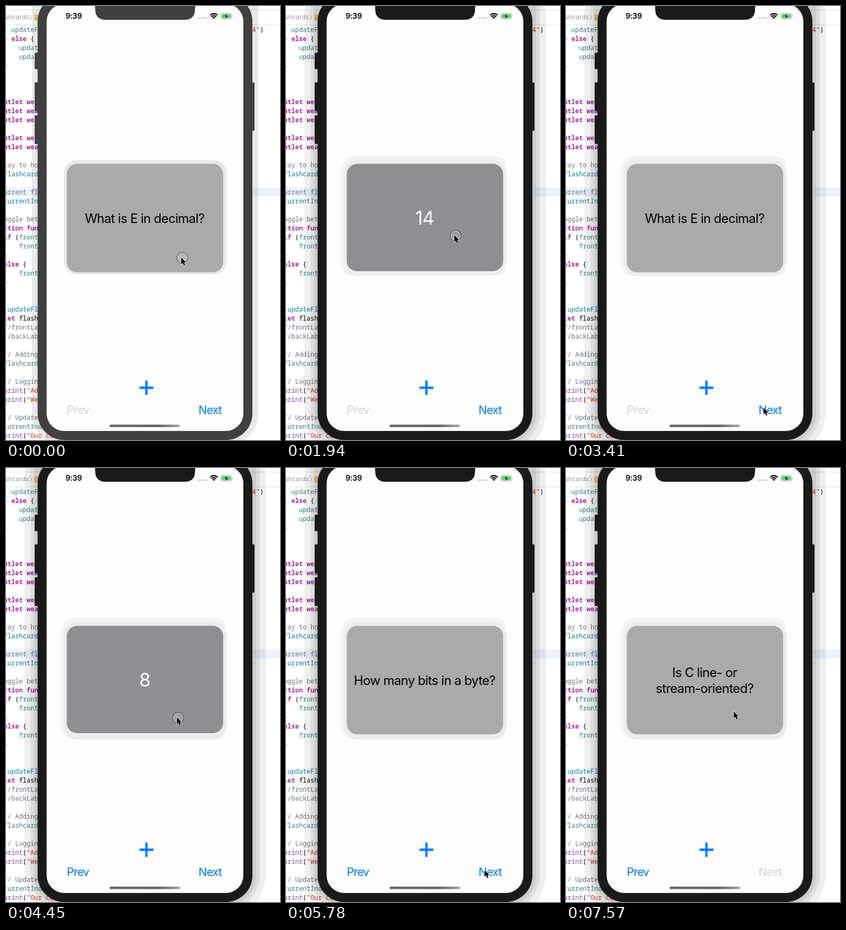
Animation of 516x818 px, one loop 8000 ms. Source, as an HTML page:

```html
<!DOCTYPE html>
<html lang="en">
<head>
<meta charset="utf-8">
<title>Flashcards</title>
<style>
  html, body { margin: 0; width: 100%; height: 100%; overflow: hidden; background: #fff; }
  svg { display: block; width: 516px; height: 818px; }
  text { font-family: Inter, Roboto, sans-serif; white-space: pre; }
  #code text { font: 12px "Noto Sans Mono", "DejaVu Sans Mono", monospace; }
  #code .key { fill: #a42f9c; font-weight: 700; }
  #code .call { fill: #3e7d86; }
  #code .own { fill: #0f7ba3; }
  #code .note { fill: #687684; }
  #code .sys { fill: #7d45b0; }
  #code .str { fill: #d12f1b; }
  .question { font-size: 24px; letter-spacing: -.7px; }
  .answer { font-size: 35px; font-weight: 400; fill: #fff; letter-spacing: -1px; }
  .button { font-size: 21.5px; letter-spacing: -1px; }
</style>
</head>
<body>
<svg viewBox="0 0 516 818">
  <defs>
    <linearGradient id="bar">
      <stop offset="0" stop-color="#6c6c6c"/>
      <stop offset=".7" stop-color="#666"/>
      <stop offset="1" stop-color="#aaa"/>
    </linearGradient>
  </defs>
  <rect width="516" height="818" fill="#fff"/>

  <path d="M0 7.5H516M0 35.5H516" stroke="#dedede"/>
  <text x="-2" y="25" font-size="12" fill="#9b9b9b">shcards</text>
  <path d="M44 15l4 6.500-4 6.500" fill="none" stroke="#a5a5a5"/>
  <rect x="53" y="16" width="14" height="11" rx="1.500" fill="#f0cf73"/>
  <rect y="342" width="516" height="17" fill="#ebf2fc"/>
  <g id="code"></g>

  <g id="halo"></g>

  <g id="bezel">
    <rect x="54" y="88" width="8" height="31" rx="1.500"/>
    <rect x="54" y="144" width="8" height="54" rx="1.500"/>
    <rect x="54" y="206" width="8" height="54" rx="1.500"/>
    <rect x="461" y="144" width="7" height="91" rx="1.500"/>
    <rect x="59.500" y="-21" width="404.500" height="839" rx="50"/>
  </g>
  <rect x="76.500" y="-4" width="370.500" height="805" rx="33" fill="#fdfdfd"/>
  <path id="notch" d="M160 -4Q168 -4 168 4V6Q168 26 188 26H336Q356 26 356 6V4Q356 -4 364 -4Z"/>

  <text x="112" y="24" font-size="14.500" font-weight="600" letter-spacing="-.4">9:39</text>
  <g fill="#b9b9b9">
    <circle cx="363.500" cy="23" r="1.500"/><circle cx="368" cy="23" r="1.500"/>
    <circle cx="372.500" cy="23" r="1.500"/><circle cx="377" cy="23" r="1.500"/>
  </g>
  <g fill="none" stroke="#000" stroke-width="2.300">
    <path d="M384.500 17.500Q391.500 11 398.500 17.500M387 20.300Q391.500 16 396 20.300"/>
    <path d="M389 21.500Q391.500 19.500 394 21.500L391.500 24.500Z" fill="#000" stroke="none"/>
  </g>
  <rect x="404.500" y="14" width="20.500" height="10.500" rx="3" fill="#fff" stroke="#a9a9a9"/>
  <rect x="406" y="15.500" width="17.500" height="7.500" rx="1.700" fill="#4cd964"/>
  <path d="M426.500 17.500q1.500 1.700 0 3.500z" fill="#a9a9a9"/>
  <path d="M416.500 13.500l-6 6.500h3.500l-1.500 5.500 6.500-7h-3.700z" fill="#111" stroke="#d9f7de" stroke-width=".6"/>

  <path id="outerGlow" d="M103 316Q103 282 137 282H386Q403 282 413 291V500Q404 509 388 509H130Q103 509 103 482Z" fill="#f3f3f3"/>
  <rect id="innerGlow" x="109" y="290" width="306.500" height="216" rx="25" fill="#e8e8e8"/>
  <rect id="strip" x="116" y="400" width="292" height="102" rx="19" fill="#fbfbfb"/>
  <rect id="card" x="114.500" y="297.500" width="294.500" rx="19.500"/>
  <g id="label" text-anchor="middle"></g>

  <path d="M264.500 706V733M251.500 719.500H277.500" stroke="#007aff" stroke-width="4.300"/>
  <text id="prev" class="button" x="114.500" y="768.500">Prev</text>
  <text id="next" class="button" x="362.500" y="768.500">Next</text>
  <rect x="195" y="789" width="133" height="4.800" rx="2.400" fill="url(#bar)"/>

  <g id="cursor">
    <g id="touch">
      <circle cx="2.200" cy="1" r="10.200" fill="#fff" fill-opacity=".15" stroke="#222"/>
      <circle cx="2.200" cy="1" r="9.200" fill="none" stroke="#fff" stroke-opacity=".7"/>
    </g>
    <path d="M0 0V12.700L2.900 10 5 15 7.200 14 5.200 9.200H9.100Z" stroke="#fff" stroke-width="1.600" stroke-opacity=".8" paint-order="stroke"/>
  </g>
</svg>
<script>
const LOOP = 8000;
const $ = id => document.getElementById(id);

// Each row: line number, column, then class:text runs separated by "|".
const LINE = 17, COLUMN = 7.2;
const source = [
  [0, 2, "call:updateFlash"], [0, 65, 'str:4"|:)'],
  [1, 0, ":} |key:else|: {"], [2, 4, "call:update"], [3, 4, "call:update"], [4, 0, ":}"],
  [8, 0, "key:utlet weak"], [9, 0, "key:utlet weak"], [10, 0, "key:utlet weak"],
  [12, 0, "key:utlet weak"], [13, 0, "key:utlet weak"],
  [15, 0, "note:ray to hold"], [16, 0, "own:flashcards"],
  [18, 0, "note:urrent flash"], [19, 0, "own:currentIndex"],
  [21, 0, "note:oggle betw"], [22, 0, "key:ction func"],
  [23, 0, "key:if|: (|call:front"], [24, 4, "call:front"], [25, 0, ":}"],
  [26, 0, "key:else|: {"], [27, 4, "call:front"], [28, 0, ":}"],
  [31, 1, "own:updateFlash"], [32, 0, "key:let|: flashcard"],
  [33, 0, "note://frontLabel"], [34, 0, "note://backLabel"],
  [36, 0, "note:// Adding"], [37, 0, "call:flashcards"],
  [39, 0, "note:// Logging"], [40, 0, 'sys:print|:(|str:"Added'], [41, 0, 'sys:print|:(|str:"We now'],
  [43, 0, "note:// Update"], [44, 0, "call:currentIndex"], [45, 0, 'sys:print|:(|str:"Our cur']
];
const run = part => {
  const cut = part.indexOf(":");
  return `<tspan class="${part.slice(0, cut)}">${part.slice(cut + 1)}</tspan>`;
};
$("code").innerHTML = source.map(([line, column, text]) =>
  `<text x="${-4.4 + column * COLUMN}" y="${49 + line * LINE}">${text.split("|").map(run).join("")}</text>`
).join("");

const shadow = (spread, alpha) =>
  `<rect x="${60 - spread}" y="-60" width="${404 + 2 * spread}" height="${878 + spread}"
    rx="${50 + spread}" fill="#000" fill-opacity="${alpha}"/>`;
const idleHalo = shadow(11, .09);
const activeHalo = shadow(25, .065) + shadow(14, .07) + shadow(7, .08);

// Cursor tip: time, x, y; every position holds until the next.
const path = [
  [0, 330, 474], [1490, 323.5, 455], [1640, 319, 437], [1790, 317, 432],
  [2830, 319, 450], [2970, 325, 520], [3120, 338, 620], [3270, 353, 710], [3410, 372, 757], [3560, 374, 758],
  [4000, 358, 680], [4150, 332, 540], [4300, 322, 470],
  [5190, 324, 490], [5340, 334, 570], [5480, 350, 670], [5630, 368, 740], [5780, 374, 758],
  [6380, 356, 670], [6530, 328, 530], [6680, 316, 459]
];
const presses = [
  [0, 290], [1790, 2090], [2530, 2680], [3700, 4000], [4300, 4590],
  [4890, 5040], [6080, 6380], [6680, 6970], [7420, 7570]
];
const cards = [
  { ask: ["What is E in decimal?"], reply: "14" },
  { ask: ["How many bits in a byte?"], reply: "8" },
  { ask: ["Is C line- or", "stream-oriented?"], reply: "Stream" }
];
const FOCUS = 1790;
const turns = [3850, 6230];
const flips = [1940, 2680, 4450, 5040, 6820, 7570];

const passed = (times, t) => times.filter(time => time <= t).length;
const show = (id, on) => { $(id).style.display = on ? "" : "none"; };
const write = (id, html) => { if ($(id).dataset.now !== html) $(id).innerHTML = $(id).dataset.now = html; };

function draw(t) {
  const index = passed(turns, t);
  const answered = passed(flips, t) % 2 === 1;
  const active = t >= FOCUS;
  const { ask, reply } = cards[index];

  $("bezel").setAttribute("fill", active ? "#1a1a1a" : "#404040");
  $("notch").setAttribute("fill", active ? "#1a1a1a" : "#404040");
  write("halo", active ? activeHalo : idleHalo);
  show("outerGlow", active);
  $("innerGlow").setAttribute("height", index ? 222 : 216);
  $("innerGlow").setAttribute("fill", active ? "#ececec" : "#e8e8e8");

  show("strip", answered);
  $("card").setAttribute("height", answered ? 202.5 : 204.5);
  $("card").setAttribute("fill", answered ? "#8e8e93" : "#aaa");
  write("label", answered
    ? `<text class="answer" x="261" y="412">${reply}</text>`
    : ask.map((line, i) =>
        `<text class="question" x="261" y="${409 + 30 * (i - (ask.length - 1) / 2)}">${line}</text>`).join(""));

  $("prev").setAttribute("fill", index ? "#007aff" : "#d6d6d6");
  $("next").setAttribute("fill", index < cards.length - 1 ? "#007aff" : "#d6d6d6");

  const [, x, y] = path.filter(([time]) => time <= t).pop();
  $("cursor").setAttribute("transform", `translate(${x} ${y})`);
  show("touch", presses.some(([from, to]) => t >= from && t < to));
}

const start = performance.now();
function tick() {
  draw((performance.now() - start) % LOOP);
  requestAnimationFrame(tick);
}
tick();
</script>
</body>
</html>
```
